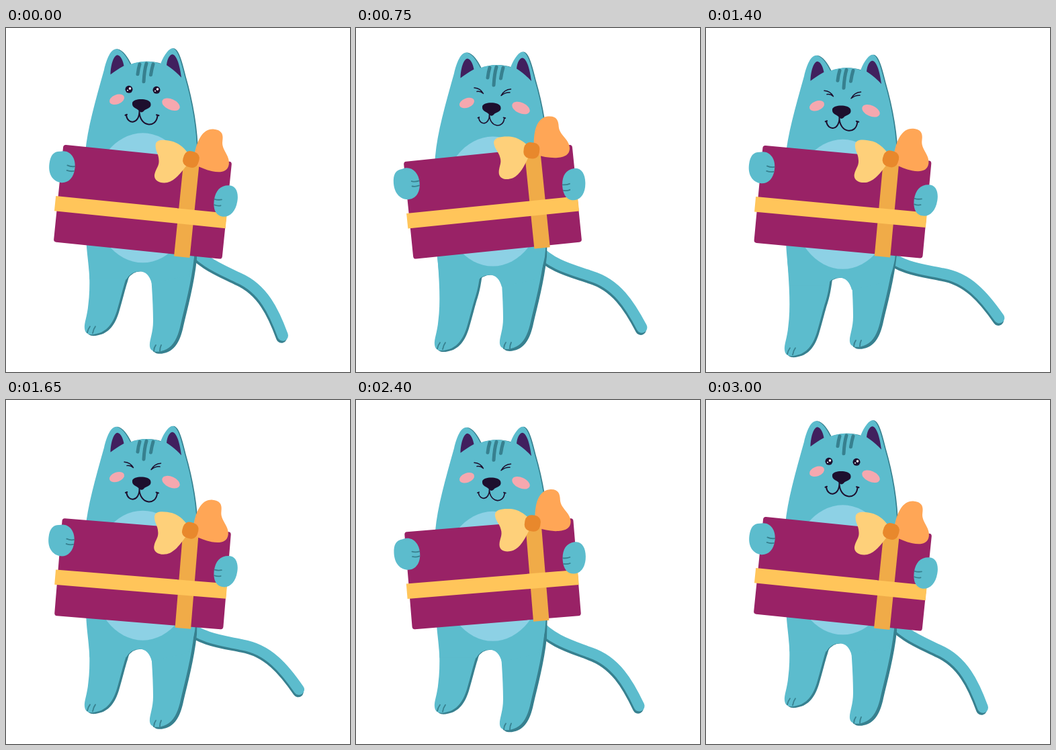
An HTML page for the animation above (3050 ms loop, 512 by 512 pixels).

```html
<!DOCTYPE html>
<html lang="en">
<head>
<meta charset="utf-8">
<title>Cat with a present</title>
<style>
  html, body { margin: 0; width: 100%; height: 100%; overflow: hidden; background: #fff; }
  svg { display: block; width: 100vw; height: 100vh; }
  .fur { fill: #5cbccd; }
  .shade { fill: #37808f; }
  .ink { fill: #1d0f2e; }
  .line { fill: none; stroke: #1d0f2e; stroke-width: 2; stroke-linecap: round; stroke-linejoin: round; }
  .mark { fill: none; stroke: #37808f; stroke-width: 1.8; stroke-linecap: round; }
  .tail { fill: none; stroke-linecap: round; }
</style>
</head>
<body>
<svg viewBox="0 0 512 512">
  <defs>
    <path id="tailLine" d="M270 321C291 350 320 360 346 373C382 389 398 423 411 458.500"/>
    <path id="legL" d="M121 312C124 350 126 385 122.500 410C121 428 116 438 117 446C118 455 125 456 134 454C150 451 159 439 165 420C171 400 174 386 178 374C181 364 184 352 187 320Z"/>
    <path id="legR" d="M212 320C216 365 219 405 219 435C219 454 213 464 214 473C215 481 224 482 231 480C246 477 255 464 260 440C266 414 276 378 280 340L281 300Z"/>
    <path id="torso" d="M118 185C121 150 133 108 146 62C150 45 156 31 164 31C172 32 180 43 185 54C198 48 218 48 230 53C236 38 243 30 248 30C256 31 261 52 266 72C277 110 284 150 284.500 190C285.500 250 285 300 281 335C278 350 275 360 271 368L217 380Q212 362 199 362Q186 362 179 374L124.500 374C123 345 119 330 119 300C116 260 115 220 118 185Z"/>
  </defs>

  <g id="cat">
    <g id="tail" class="tail">
      <use href="#tailLine" stroke="#37808f" stroke-width="16" x="-1" y="2"/>
      <use href="#tailLine" stroke="#5cbccd" stroke-width="16" x="1" y="-1"/>
    </g>
    <use class="shade" href="#torso" x="1.700"/>
    <g id="left">
      <use class="shade" href="#legL" x="3" y="2"/>
      <use class="fur" href="#legL"/>
      <path class="mark" d="M121 452Q122 447 125 443M129 453Q130 447 133 443"/>
    </g>
    <g id="right">
      <use class="shade" href="#legR" x="4" y="3"/>
      <use class="fur" href="#legR"/>
      <path class="mark" d="M220 480Q220 475 223 471M229 480Q229 475 231 471"/>
    </g>
    <use class="fur" href="#torso"/>
    <ellipse cx="203.500" cy="252.500" rx="75" ry="96.500" fill="#8dd1e5"/>

    <g fill="#41205e">
      <path d="M155.500 69C156 52 161 40 166 40C171 41 174 48 175.500 56C168 60 162 64 155.500 69Z"/>
      <path d="M239 55C240 45 244 39 248 39C255 41 259 58 261 73.500C255 67 247 60 239 55Z"/>
    </g>
    <path d="M199 53.500Q197 60 196 68.500M209 52.500Q206 62 205 79.500M219 53.500Q217 60 215.500 69.500" class="mark" style="stroke-width:5"/>
    <g fill="#f5a8af">
      <ellipse cx="165" cy="106" rx="11.500" ry="7" transform="rotate(-20 165 106)"/>
      <ellipse cx="245.500" cy="113.500" rx="14" ry="8" transform="rotate(24 245.500 113.500)"/>
    </g>
    <g id="open">
      <circle class="ink" cx="183" cy="91" r="5.500"/>
      <circle class="ink" cx="224" cy="92" r="5.500"/>
      <g fill="#fff">
        <circle cx="184.500" cy="89.800" r="1.800"/><circle cx="181" cy="92.500" r="1"/>
        <circle cx="225.500" cy="90.800" r="1.800"/><circle cx="222" cy="93.500" r="1"/>
      </g>
    </g>
    <path id="shut" class="line" style="stroke-width:1.500" d="M176 83.500Q185 84 189.500 92Q185 88 180 89M230.500 85.500Q221 86 216 95Q222 90 229 90.500"/>
    <path class="ink" d="M188 111C190 104 212 104 215 111C218 120 208 119 205 123.500Q201 127 198 123C195 119 187 119 188 111Z"/>
    <path id="mouth" class="line" d="M177.500 129.500L180 128.500M179 129.500C181 144 199 143 198.500 123C198 147 224 150 225.500 130M224 129L227.500 130"/>
  </g>

  <g id="gift">
    <rect x="77.500" y="186" width="252" height="145.500" rx="4" fill="#992266"/>
    <rect x="258" y="188" width="23.500" height="146.500" fill="#f0ab48"/>
    <rect x="74" y="263" width="256" height="22.500" fill="#ffc55a"/>
    <path fill="#fed07a" d="M214 172C214 163 228 163 240 165C252 168 259 175 266 183L265 195C258 206 250 222 237 226.500C225 229.500 216 225 217 216C218 207 223 203 221 194C220 185 214 181 214 172Z"/>
    <path fill="#ffa656" d="M273 180C275 160 281 141 298 140.500C311 140.500 313 148 312.500 157C312 170 326 177 325.500 190C325 202 314 204 302 203C292 202 284 199 275 196Z"/>
    <rect x="257" y="176.500" width="23.500" height="24" rx="9.500" fill="#e8882c" transform="rotate(12 268.500 188.500)"/>
    <path class="fur" d="M74 196.500C87 192 98.500 203 98 219C98 235 89 243 79 242.500C66.500 241.500 59 231 59.500 216C60 203 64.500 197 74 196.500Z"/>
    <path class="fur" d="M329 221.500C340 221 344.500 232 343.500 244C342.500 260 334 269 324 268.500C313 268 308.500 258 309 245C310 231 316 222.500 329 221.500Z"/>
    <path class="mark" d="M86.500 216Q92 218 97.500 216.500M86.500 223.500Q92 225 97 223.500M309.500 244Q315 245 320 243.500M310 252.500Q315 254 319.500 252.500"/>
  </g>
</svg>
<script>
const LOOP = 3050, STEP = 50, TURN = 2 * Math.PI;
const part = id => document.getElementById(id);
const move = (id, value) => part(id).setAttribute("transform", value);
const show = (id, on) => part(id).style.display = on ? "" : "none";
const wave = (t, period) => Math.cos(TURN * t / period);

function draw(t) {
  const sway = wave(t, 1500);
  const a = TURN * t / 600;
  const c = Math.cos(a), s = Math.sin(a), c2 = Math.cos(2 * a), s2 = Math.sin(2 * a);
  const left = 10.1 - 8.5 * c + 9 * s - 0.6 * c2 - 1.2 * s2;
  const right = -8 + 11 * c - 2.95 * s - 2.4 * c2 + 1.2 * s2;
  const grin = 0.91 + 0.09 * sway;
  const shut = t >= 500 && t < 2500;

  move("cat", `translate(0 ${0.3 + 5.25 * (1 - wave(t, 1000))})`);
  move("tail", `rotate(${7.4 * (wave(t, 3000) - 1)} 285 345)`);
  move("left", `translate(0 ${left})`);
  move("right", `translate(0 ${right})`);
  move("mouth", `translate(199 122) scale(${grin}) translate(-199 -122)`);
  move("gift", `rotate(${5.8 * sway} 203.5 258.5)`);
  show("open", !shut);
  show("shut", shut);
}

function tick() {
  draw(Math.floor(performance.now() % LOOP / STEP) * STEP);
  requestAnimationFrame(tick);
}
tick();
</script>
</body>
</html>
```
